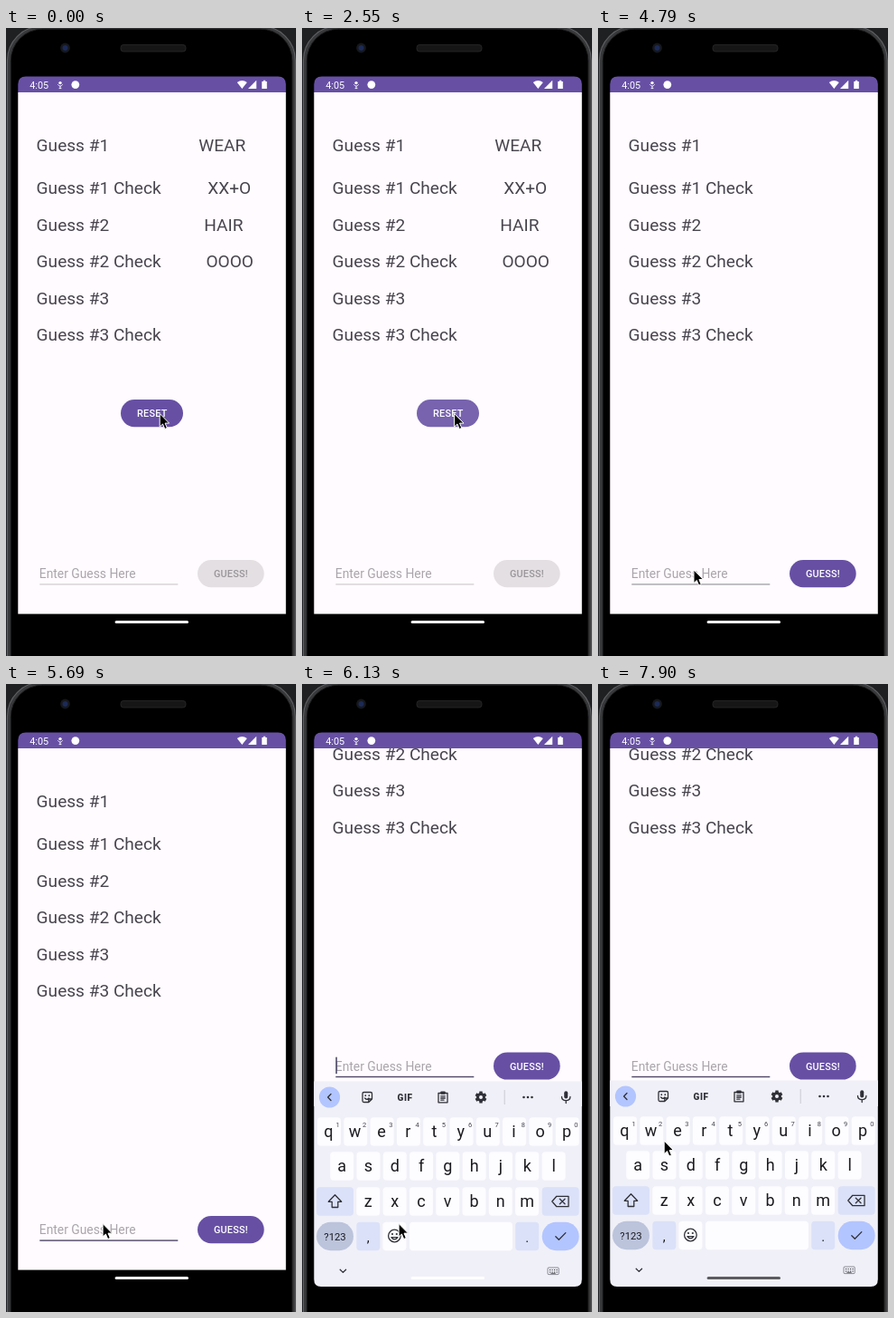
An HTML page that plays this animation: 321x693 px, repeating every 8 s.

```html
<!DOCTYPE html>
<html lang="en">
<head>
<meta charset="utf-8">
<title>Word guess</title>
<style>
html, body { margin: 0; width: 100%; height: 100%; overflow: hidden; background: #000; }
svg { display: block; width: 100vw; height: 100vh; font-family: Roboto, "Open Sans", sans-serif; }
.row { font-size: 19.1px; fill: #49454f; }
.btn { font-size: 10.9px; letter-spacing: .22px; font-weight: 500; }
.hint { font-size: 13.85px; fill: #a9a5ab; }
.key { font-size: 18px; text-anchor: middle; fill: #1b1b1f; }
.small { font-size: 11.3px; }
.mark { font-size: 15px; }
.num { font-size: 7.5px; text-anchor: middle; fill: #44464f; }
.line { fill: none; stroke: #303138; stroke-width: 1.3; stroke-linecap: round; stroke-linejoin: round; }
.ink { fill: #303138; }
</style>
</head>
<body>
<svg viewBox="0 0 321 693" preserveAspectRatio="none">
  <defs>
    <clipPath id="page"><rect x="13.3" y="71" width="296.5" height="594"/></clipPath>
    <clipPath id="screen"><path d="M13.3 71H309.8V657Q309.8 665 302 665H21Q13.3 665 13.3 657Z"/></clipPath>
  </defs>

  <rect width="321" height="693" fill="#1f2022"/>
  <rect x="1.5" y="-2" width="318.8" height="740" rx="38" fill="#38393b" stroke="#5e5f62" stroke-width="1.2"/>
  <rect x="5.3" y="1.2" width="311.6" height="740" rx="35" fill="#000" stroke="#1c1c1d"/>
  <circle cx="65.5" cy="22" r="5.4" fill="#16181c"/>
  <circle cx="65.5" cy="22" r="3" fill="#1c2a55"/>
  <rect x="127" y="18.5" width="72" height="7.5" rx="3" fill="#161617" stroke="#2a2a2b" stroke-width=".8"/>

  <g clip-path="url(#page)">
    <g id="content">
      <rect x="13" y="60" width="297" height="586.6" fill="#fffbfe"/>
      <g id="rows" class="row"></g>
      <g id="values" class="row"></g>
      <g id="reset">
        <rect id="resetBox" x="127" y="410" width="69" height="30.2" rx="15.1"/>
        <text class="btn" x="145" y="429.2" fill="#fff">RESET</text>
      </g>
      <text class="hint" x="36.8" y="607.3">Enter Guess Here</text>
      <rect id="underline" x="37.3" width="153"/>
      <rect id="caret" x="37.3" y="592.3" width="1.5" height="18.4" fill="#474060"/>
      <rect id="guessBox" x="212" y="587" width="73.7" height="30.2" rx="15.1"/>
      <text id="guessText" class="btn" x="229.9" y="606.2">GUESS!</text>
    </g>
  </g>

  <path d="M13.3 71V62Q13.3 53.4 22 53.4H301Q309.8 53.4 309.8 62V71Z" fill="#6750a4"/>
  <g fill="#fff">
    <text x="26.3" y="66.7" font-size="10.8">4:05</text>
    <circle cx="60" cy="60.6" r="1.7"/>
    <path d="M57.3 62.3Q60 66 62.7 62.3M60 64V66.6M58.6 66.6H61.4" fill="none" stroke="#fff" stroke-width=".9"/>
    <circle cx="76.8" cy="62.6" r="4.4"/>
    <path d="M255.8 60Q261.3 55.8 266.8 60L261.3 67ZM268 67L277.2 57.8V67ZM283.2 59H284.8V57.8H287.2V59H288.8V67H283.2Z"/>
  </g>

  <g clip-path="url(#screen)"><g id="keyboard"></g></g>
  <rect id="pill" x="120.6" y="654.1" width="81.4" height="3" rx="1.5"/>
  <path id="cursor" d="M0 0V14.6L3.3 11.5 5.6 17 8.2 15.9 5.9 10.6H10.4Z" fill="#000" stroke="#fff" stroke-width="1" stroke-linejoin="round"/>
</svg>
<script>
const LOOP = 8000;
const PRIMARY = '#6750a4';
const $ = id => document.getElementById(id);
const set = (id, attrs) => {
  for (const name in attrs) $(id).setAttribute(name, attrs[name]);
};
const show = (id, on) => set(id, { visibility: on ? 'visible' : 'hidden' });

// Value of the last step that has begun; each step is [time, value].
const stepAt = (steps, t) => steps.reduce((now, [start, value]) => t >= start ? value : now, null);

const label = (x, y, text, cls = '') => `<text x="${x}" y="${y}" class="${cls}">${text}</text>`;
const line = d => `<path class="line" d="${d}"/>`;
const dot = (x, y, r) => `<circle class="ink" cx="${x}" cy="${y}" r="${r}"/>`;

const rowY = i => i ? 183.3 + (i - 1) * 40.5 : 136.2;
$('rows').innerHTML = [...Array(6).keys()].map(i =>
  label(33.6, rowY(i), `Guess #${(i >> 1) + 1}${i % 2 ? ' Check' : ''}`)).join('');
$('values').innerHTML = [[213.2, 'WEAR'], [223.3, 'XX+O'], [219.2, 'HAIR'], [221.4, 'OOOO']]
  .map(([x, text], i) => label(x, rowY(i), text)).join('');

const PITCH = 29.3, KEY_H = 31.4;
const SOFT = '#dbe1f8', ACCENT = '#b3c5ff';

function cap(cx, cy, w, fill = '#fdfcff', r = 4) {
  return `<rect x="${cx - w / 2}" y="${cy - KEY_H / 2}" width="${w}" height="${KEY_H}" rx="${r}" fill="${fill}"/>`;
}

function letters(text, x, cy, numbered) {
  return [...text].map((ch, i) => {
    const cx = x + i * PITCH;
    return cap(cx, cy, 26) + label(cx - (numbered ? .7 : 0), cy + 5.6, ch, 'key') +
      (numbered ? label(cx + 9.7, cy - 5.5, (i + 1) % 10, 'num') : '');
  }).join('');
}

function toolbar() {
  const y = 455;
  const teeth = [...Array(6).keys()].map(i => {
    const a = (i + .5) * Math.PI / 3, c = Math.cos(a), s = Math.sin(a);
    return `M${198 + 3 * c} ${y + 3 * s}L${198 + 6.4 * c} ${y + 6.4 * s}`;
  }).join('');
  return `<circle cx="30.5" cy="${y}" r="11.6" fill="${ACCENT}"/>` +
    line('M32 451.5L28.6 455 32 458.5') +
    line('M67 451Q67 449.5 68.5 449.5H76Q77.5 449.5 77.5 451V457L73.8 460.5H68.5Q67 460.5 67 459ZM77.3 457H73.8V460.3M69.6 456Q72 458.7 74 456') +
    dot(70.3, 453.2, .9) + dot(74.3, 453.2, .9) +
    `<text x="114" y="458.7" font-size="10" font-weight="800" letter-spacing=".5" text-anchor="middle" class="ink">GIF</text>` +
    line('M151 450.5H161V460.8H151ZM153.7 453.8H158.3M153.7 456H158.3M153.7 458.2H157') +
    `<rect class="ink" x="153.2" y="448.6" width="5.6" height="3.2" rx="1"/>` +
    `<path d="${teeth}" stroke="#303138" stroke-width="3.4"/>` +
    `<circle cx="198" cy="${y}" r="3.5" fill="none" stroke="#303138" stroke-width="3"/>` +
    `<path d="M224.2 447V463" stroke="#c9cad3"/>` +
    [245.5, 250, 254.5].map(x => dot(x, y, 1.3)).join('') +
    `<rect class="ink" x="290.2" y="448.3" width="4" height="8.2" rx="2"/>` +
    line('M287.5 454.5Q287.5 458.6 292.2 458.6 296.9 458.6 296.9 454.5M292.2 458.8V461.5');
}

function smallKeys() {
  const y = 570, b = 608.5;
  const tinyKeys = [645, 647.5].map(r => [274, 276.5, 279, 281.5]
    .map(x => `<rect class="ink" x="${x}" y="${r}" width="1.1" height="1.1"/>`).join('')).join('');
  return cap(36.5, y, 41, SOFT) + cap(286.2, y, 41, SOFT) +
    line('M36.5 562.8L29.3 570.3H33.2V576.5H39.8V570.3H43.7Z') +
    line('M276.8 570L281.8 564.3H295V575.7H281.8ZM285.3 567.2L291 572.8M291 567.2L285.3 572.8') +
    cap(36.5, b, 41, '#bcc4dc', 15.7) + label(36.5, b + 4, '?123', 'key small') +
    cap(73.3, b, 26, SOFT) + label(73.3, b + 6, ',', 'key mark') +
    cap(102.4, b, 26) +
    `<circle class="line" cx="102.4" cy="608" r="6.8"/>` + dot(100, 606, 1.1) + dot(104.8, 606, 1.1) +
    line('M98.9 609.6Q102.4 614.2 105.9 609.6Z') +
    cap(176, b, 114) +
    cap(249.2, b, 26, SOFT) + label(249.2, b + 6, '.', 'key mark') +
    cap(286.2, b, 41, ACCENT, 15.7) + line('M280.8 608.7L284.3 612.2 291.8 604.6') +
    line('M42.2 645.2L45.4 648.4 48.6 645.2') +
    `<rect x="272" y="643" width="12.2" height="7.6" rx="1" fill="none" stroke="#70717a" stroke-width=".8"/>` +
    tinyKeys + `<path d="M275.5 649.3H280.7" stroke="#303138" stroke-width=".8"/>`;
}

$('keyboard').innerHTML =
  '<rect x="13" y="437.5" width="297" height="230" fill="#f0f0f8"/>' + toolbar() +
  letters('qwertyuiop', 30, 493, true) + letters('asdfghjkl', 44.2, 531) +
  letters('zxcvbnm', 73.3, 570) + smallKeys();

const pointer = [
  [0, [170.2, 425.5]], [150, [168.6, 425.5]],
  [3900, [128, 533]], [4040, [120, 574]], [4190, [111, 606]], [4340, [104, 619]],
  [4490, [101.5, 615]], [4640, [103.5, 605]], [4790, [106, 598]], [4940, [107.1, 595.5]],
  [7460, [101, 572]], [7610, [90, 540]], [7750, [79, 514]], [7900, [73.2, 504]]
];
const caret = [[0, 0], [5240, 1], [5690, 0], [6130, 1], [6720, 0], [7160, 1], [7610, 0]];
const scroll = [[0, 0], [5980, -176.3], [6130, -180.6]];
const slide = [[0, 240], [5980, 128], [6130, 1], [6280, 0]];
const pill = [[0, '#fff'], [7020, '#dcdce2'], [7160, '#b4b4ba'], [7460, '#8c8c92'], [7610, '#707076'], [7750, '#616166'], [7900, '#5c5c60']];

function draw(t) {
  const cleared = t >= 2700, focused = t >= 5090;
  show('values', !cleared);
  show('reset', !cleared);
  show('caret', stepAt(caret, t));
  show('keyboard', t >= 5980);
  set('resetBox', { fill: t >= 2550 ? '#7763ae' : PRIMARY });
  set('guessBox', { fill: cleared ? PRIMARY : '#e3dfe2' });
  set('guessText', { fill: cleared ? '#fff' : '#99959a' });
  set('underline', {
    y: focused ? 613.4 : 613.5,
    height: focused ? 1.4 : .9,
    fill: focused ? '#4f4768' : cleared ? '#77737c' : '#bdb9bf'
  });
  set('content', { transform: `translate(0 ${stepAt(scroll, t)})` });
  set('keyboard', {
    transform: `translate(0 ${stepAt(slide, t)})`,
    opacity: t < 6130 ? .33 : 1
  });
  set('pill', { fill: stepAt(pill, t) });
  set('cursor', { transform: `translate(${stepAt(pointer, t)})` });
}

const start = performance.now();
function tick() {
  draw((performance.now() - start) % LOOP);
  requestAnimationFrame(tick);
}
tick();
</script>
</body>
</html>
```
